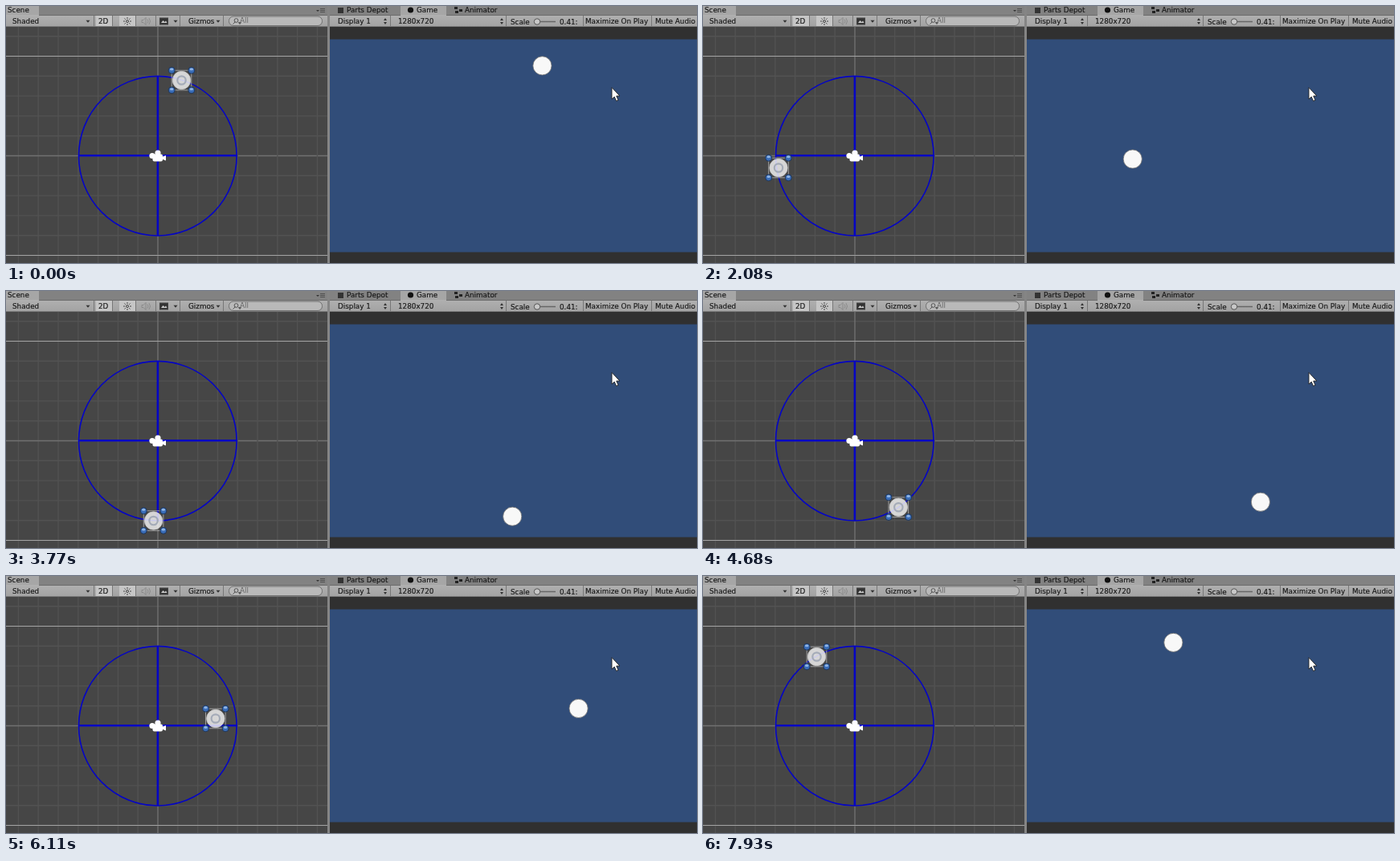
These frames come from a looping animation (860 px wide and 320 px high, 8 s). An HTML page:

```html
<!DOCTYPE html>
<html lang="en">
<head>
<meta charset="utf-8">
<title>Ball kept inside a circle</title>
<style>
  html, body { margin: 0; width: 100%; height: 100%; overflow: hidden; background: #464646; }
  svg { display: block; }
  text { font: 8.8px "DejaVu Sans", Verdana, sans-serif; fill: #161616; stroke: #161616; stroke-width: .15px; }
  .crisp { shape-rendering: crispEdges; }
</style>
</head>
<body>
<svg width="860" height="320" viewBox="0 0 860 320">
  <defs>
    <linearGradient id="bar" x2="0" y2="1">
      <stop offset="0" stop-color="#b0b0b0"/><stop offset="1" stop-color="#a2a2a2"/>
    </linearGradient>
    <clipPath id="sceneClip"><rect y="26" width="400" height="294"/></clipPath>
    <path id="drop" d="M-2.5-1.2h5L0 1.8z" fill="#333"/>
    <path id="updown" d="M-2-1L0-4 2-1zM-2 1L0 4 2 1z" fill="#333"/>
    <g id="handle">
      <circle r="4" fill="#3a6db8" stroke="#1c3252" stroke-width=".9"/>
      <ellipse cy="-1.4" rx="2.3" ry="1.5" fill="#8fb4e4"/>
    </g>
  </defs>

  <!-- scene view -->
  <g clip-path="url(#sceneClip)">
    <rect y="26" width="400" height="294" fill="#464646"/>
    <g id="grid" stroke-width="1.4"></g>
    <g class="crisp" fill="#a2a2a2">
      <rect y="62" width="400" height="1"/><rect y="310" width="400" height="1"/>
    </g>
    <g fill="none" stroke="#0505c4">
      <ellipse cx="188.8" cy="186.7" rx="98.3" ry="99.3" stroke-width="1.6"/>
      <path d="M90 186.3H287M188.9 87V286" stroke-width="2.6"/>
    </g>
    <g fill="#fff">
      <circle cx="189" cy="183" r="3.6"/><circle cx="182" cy="186.5" r="3.6"/>
      <rect x="182.5" y="184.5" width="12.5" height="9" rx="2"/>
      <path d="M194 188l5-2v6.5l-5-2z"/>
    </g>
    <g id="gizmo">
      <circle r="11.2" fill="#f6f6f6" fill-opacity=".82" stroke="#c8c8c8" stroke-width=".8"/>
      <rect x="-12.3" y="-12.3" width="24.6" height="24.6" fill="none" stroke="#a8a8a8" stroke-width=".9"/>
      <circle r="5.2" fill="none" stroke="#a4abb8" stroke-width="2.2"/>
      <use href="#handle" x="-12.3" y="-12.3"/><use href="#handle" x="12.3" y="-12.3"/>
      <use href="#handle" x="-12.3" y="12.3"/><use href="#handle" x="12.3" y="12.3"/>
    </g>
  </g>

  <!-- game view -->
  <rect x="403" y="26" width="457" height="294" fill="#303030"/>
  <rect x="403" y="41.5" width="457" height="265" fill="#314d79"/>
  <circle id="gameBall" r="11.6" fill="#f8f8f8" stroke="#6d6d6d" stroke-width=".8"/>
  <path d="M754 101.5V116l3.2-3 2.4 5.3 2.4-1.1-2.3-5.2h4.2z" fill="#fff" stroke="#222" stroke-width=".9"/>

  <!-- tabs and toolbars -->
  <rect width="860" height="11" fill="#828282"/>
  <rect width="41" height="11" fill="#a6a6a6"/>
  <rect x="491" width="57" height="11" fill="#a6a6a6"/>
  <rect y="11" width="860" height="15" fill="url(#bar)"/>
  <path class="crisp" d="M41 11H400M403 11H491M548 11H860" stroke="#6c6c6c" fill="none"/>
  <rect y="25" width="860" height="1" fill="#777"/>
  <g fill="#c6c6c6"><rect x="112" y="12" width="20" height="13"/><rect x="141" y="12" width="20" height="13"/></g>
  <g id="separators" class="crisp" fill="#777"></g>
  <rect x="400" width="3" height="320" fill="#858585"/>

  <g fill="none" stroke="#444">
    <path d="M151 14v2M151 22v2M146 19h2M154 19h2M147.5 15.5l1.3 1.3M153.2 21.2l1.3 1.3M147.5 22.5l1.3-1.3M153.2 16.8l1.3-1.3"/>
    <circle cx="151" cy="19" r="1.5"/>
    <path d="M169 17.5h2l3-3v9l-3-3h-2zM176 16.5q2 2.5 0 5M178 15q3 4 0 8" stroke="#888" stroke-width=".9"/>
    <rect x="191.5" y="15" width="10" height="8" fill="#333"/>
    <path d="M193 21l2.5-3 2 2 1.5-1.5 1.5 2.5z" fill="#ccc" stroke="none"/>
    <path d="M391 3.5h6M391 5.5h6M391 7.5h6" stroke-width=".8"/>
    <path d="M386 5h4l-2 2z" fill="#333" stroke="none"/>
  </g>
  <rect x="277.5" y="13" width="116" height="11.5" rx="5.5" fill="#b9b9b9" stroke="#707070"/>
  <path d="M285.5 19.5l-3 3M289.5 20.5h3l-1.5 2z" stroke="#555" fill="#555"/>
  <circle cx="286.5" cy="18" r="2.4" fill="none" stroke="#555"/>
  <g id="arrows"></g>

  <path d="M660 19.5H684" stroke="#666" stroke-width="1.5"/>
  <circle cx="661" cy="19.5" r="3.7" fill="#c8c8c8" stroke="#555"/>
  <rect x="413" y="2" width="7" height="7" fill="#333"/>
  <circle cx="503.5" cy="5" r="3.6" fill="#111"/>
  <g fill="#222"><rect x="558" y="1" width="4" height="3"/><rect x="564" y="4" width="4" height="3"/><rect x="559" y="6" width="4" height="3"/></g>
  <g id="labels"></g>
</svg>

<script>
const LOOP = 8000, STEP = 130;
const SCENE = { x: 189, y: 186 }, GAME = { x: 636, y: 174 }, ZOOM = 1.066;
const GRID = 24.8;
const $ = id => document.getElementById(id);

function add(parent, tag, attrs, content = "") {
  const node = document.createElementNS("http://www.w3.org/2000/svg", tag);
  for (const key in attrs) node.setAttribute(key, attrs[key]);
  node.textContent = content;
  $(parent).append(node);
}

for (let i = -8; i <= 8; i++) {
  const stroke = i ? "#525252" : "#707070";
  const x = SCENE.x + i * GRID, y = SCENE.y + .5 + i * GRID;
  add("grid", "path", { d: `M${x} 26V320M0 ${y}H400`, stroke });
}
for (const x of [109, 132, 161, 186, 216, 270, 478, 622, 718, 803])
  add("separators", "rect", { x, y: 12, width: 1, height: 13 });
for (const x of [102, 211, 264]) add("arrows", "use", { href: "#drop", x, y: 19 });
for (const x of [472, 617]) add("arrows", "use", { href: "#updown", x, y: 19 });

const labels = [
  [2, 7.5, "Scene"], [8, 22, "Shaded"], [115, 22, "2D"], [227, 22, "Gizmos"],
  [424, 7.5, "Parts Depot"], [511, 7.5, "Game"], [571, 7.5, "Animator"],
  [413, 22, "Display 1"], [488, 22, "1280x720"], [628, 23, "Scale"],
  [689, 22.5, "0.41:"], [721, 22, "Maximize On Play"], [808, 22, "Mute Audio"]
];
for (const [x, y, label] of labels) add("labels", "text", { x, y }, label);
add("labels", "text", { x: 291, y: 21, style: "fill:#666;stroke:none" }, "All");

// Straight runs hold time and offset from the centre; the rim run holds time, angle and radius.
const start = [[0, 29.5, -93.5], [530, -8, -93.5], [650, -16, -85], [1750, -94, -8], [2080, -95, 15.5]];
const rim = [[2080, 189.3, 96.3], [2730, 216, 100.5], [3770, 266.9, 100.2], [4550, 297.5, 100], [5460, 336.9, 95.7]];
const end = [[5460, 88, 37.5], [5880, 88, 8], [6890, 17, -64.5], [7280, -7, -64.5], [7640, -28, -64.5], [7930, -47.5, -85.5]];

function along(run, t) {
  const i = Math.max(1, run.findIndex(p => p[0] >= t));
  const [t0, a0, b0] = run[i - 1], [t1, a1, b1] = run[i];
  const k = (t - t0) / (t1 - t0);
  return [a0 + (a1 - a0) * k, b0 + (b1 - b0) * k];
}

function ballAt(t) {
  if (t <= 2080) return along(start, t);
  if (t >= 5460) return along(end, t);
  const [degrees, radius] = along(rim, t);
  const angle = degrees * Math.PI / 180;
  return [radius * Math.cos(angle), -radius * Math.sin(angle)];
}

const place = (id, x, y) => $(id).setAttribute("transform", `translate(${x.toFixed(2)} ${y.toFixed(2)})`);

function draw(time) {
  const [dx, dy] = ballAt(Math.floor(time % LOOP / STEP) * STEP);
  place("gizmo", SCENE.x + dx, SCENE.y + dy);
  place("gameBall", GAME.x + dx * ZOOM, GAME.y + dy * ZOOM);
}

const begin = performance.now();
function tick() {
  draw(performance.now() - begin);
  requestAnimationFrame(tick);
}
tick();
</script>
</body>
</html>
```
